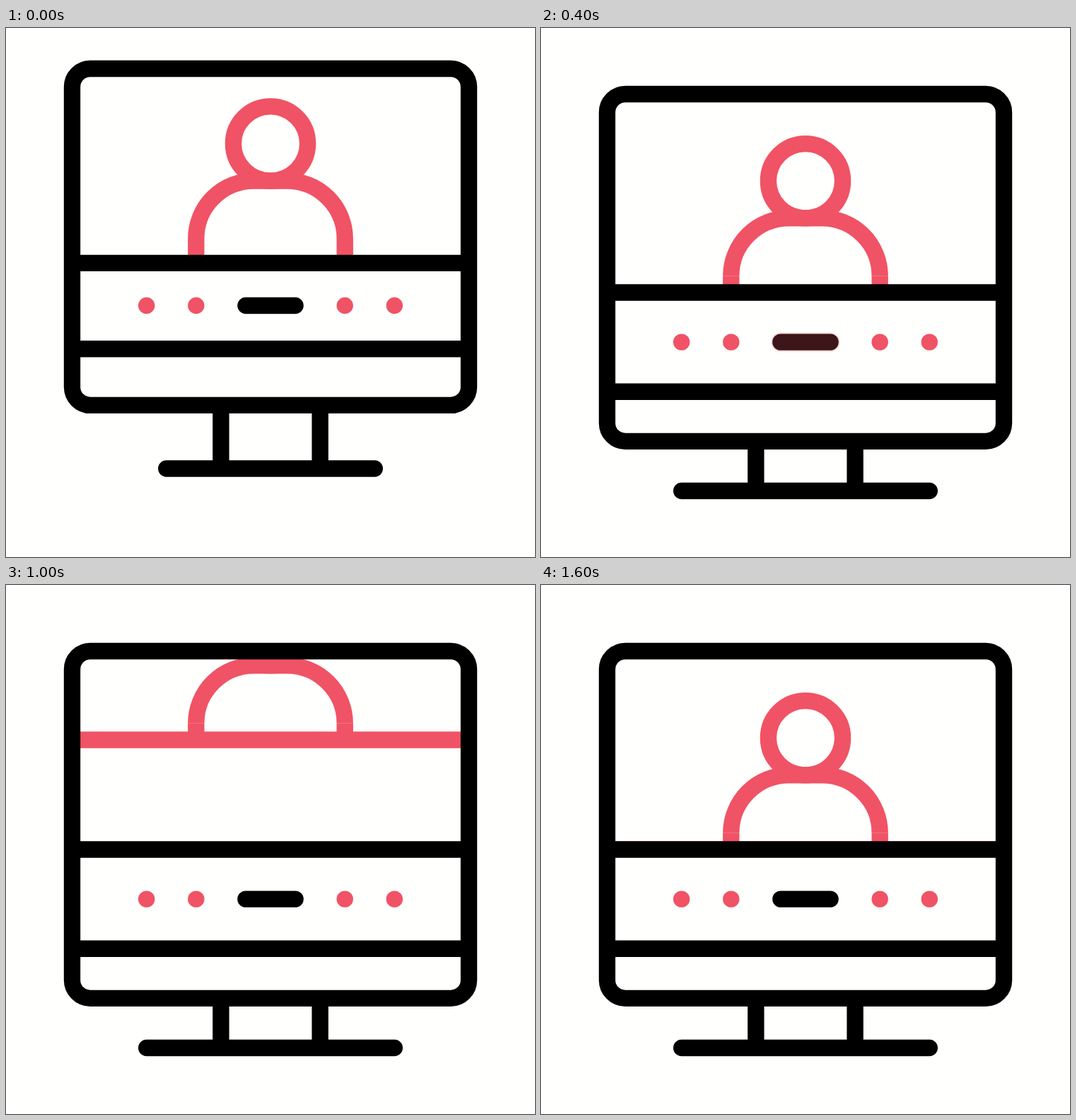
Write an HTML page that moves like this. It is 748 px wide and 748 px high and loops after 1670 ms.

```html
<!DOCTYPE html>
<html lang="en">
<head>
<meta charset="utf-8">
<title>Video call</title>
<style>
  html, body { margin: 0; width: 100%; height: 100%; overflow: hidden; background: #fffffd; }
  svg { display: block; width: 100vw; height: 100vh; }
  .ink { stroke: #000; }
  .red { stroke: #f05365; }
</style>
</head>
<body>
<svg viewBox="0 0 32 32" fill="none">
  <defs>
    <clipPath id="view"><rect id="pane" x="4" width="24"/></clipPath>
    <g id="person">
      <circle cx="16" cy="9.25" r="2.25"/>
      <path d="M11.5 15A3.5 3.5 0 0 1 15 11.5H17A3.5 3.5 0 0 1 20.5 15"/>
    </g>
  </defs>
  <g clip-path="url(#view)" class="red">
    <g id="leaving"><use href="#person"/><path d="M11.5 15V17M20.5 15V17"/></g>
    <g id="arriving"><use href="#person"/><path d="M11.5 15V16M20.5 15V16M4 16H28"/></g>
  </g>
  <g class="ink">
    <rect id="frame" x="4" width="24" rx="1.1"/>
    <path id="bars"/>
    <path id="legs"/>
    <path id="base" stroke-linecap="round"/>
  </g>
  <g id="controls" stroke-linecap="round">
    <path class="red" d="M8.5 0h0M11.5 0h0M20.5 0h0M23.5 0h0"/>
    <path class="ink" d="M14.5 0H17.5"/>
    <path id="glow" class="red" stroke-width="1.15" d="M14.5 0H17.5"/>
  </g>
</svg>
<script>
const LOOP = 1670, STEP = 66.7;
const TRAVEL = 20.25;
const el = id => document.getElementById(id);
const set = (id, attrs) => {
  for (const name in attrs) el(id).setAttribute(name, attrs[name]);
};

// step, top, person shift, upper bar, controls, lower bar, bottom, base, half base width
const poses = [
  [0, 2.46, -2.255, 14.22, 16.79, 19.41, 22.82, 26.65, 6.3],
  [2, 5.24, 0.3, 16.75, 19.7, 22.25, 25.3, 27.88, 8.33],
  [3, 4.5, 0.12, 16.3, 19.3, 22.1, 25.12, 28.08, 7.8],
  [4, 4, 0, 16, 19, 22, 25, 28, 7.5]
];

const clamp = x => Math.min(1, Math.max(0, x));
const smooth = p => p * p * (3 - 2 * p);

// cubic-bezier(x, 0, 1 - x, 1)
function ease(u, x) {
  let lo = 0, hi = 1;
  for (let i = 0; i < 24; i++) {
    const p = (lo + hi) / 2, q = 1 - p;
    if (3 * p * q * q * x + 3 * p * p * q * (1 - x) + p * p * p < u) lo = p;
    else hi = p;
  }
  return smooth(lo);
}

function poseAt(step) {
  const next = poses.findIndex(p => p[0] > step);
  if (next < 0) return poses[poses.length - 1];
  const a = poses[next - 1], b = poses[next];
  const k = smooth((step - a[0]) / (b[0] - a[0]));
  return a.map((v, i) => v + (b[i] - v) * k);
}

function draw(ms) {
  const step = Math.floor((ms % LOOP + 5) / STEP) % 25;
  const [, top, shift, upper, mid, lower, bottom, base, half] = poseAt(step);
  const scroll = TRAVEL * ease(clamp((step - 6) / 14.3), 0.26);

  set("pane", { y: top, height: upper - top });
  set("leaving", { transform: `translate(0 ${shift + scroll})` });
  set("arriving", { transform: `translate(0 ${scroll - TRAVEL})`, opacity: step < 6 ? 0 : 1 });
  // Once home, the arriving person's bar hides under the upper bar.
  set("frame", { y: top, height: bottom - top });
  set("bars", { d: `M4 ${upper}H28M4 ${lower}H28` });
  set("legs", { d: `M13 ${bottom}V${base}M19 ${bottom}V${base}` });
  set("base", { d: `M${16 - half} ${base}H${16 + half}` });
  set("controls", { transform: `translate(0 ${mid})` });
  set("glow", { opacity: clamp(1 - Math.abs(step - 9) / 4) });
}

const start = performance.now();
function tick() {
  draw(performance.now() - start);
  requestAnimationFrame(tick);
}
tick();
</script>
</body>
</html>
```
